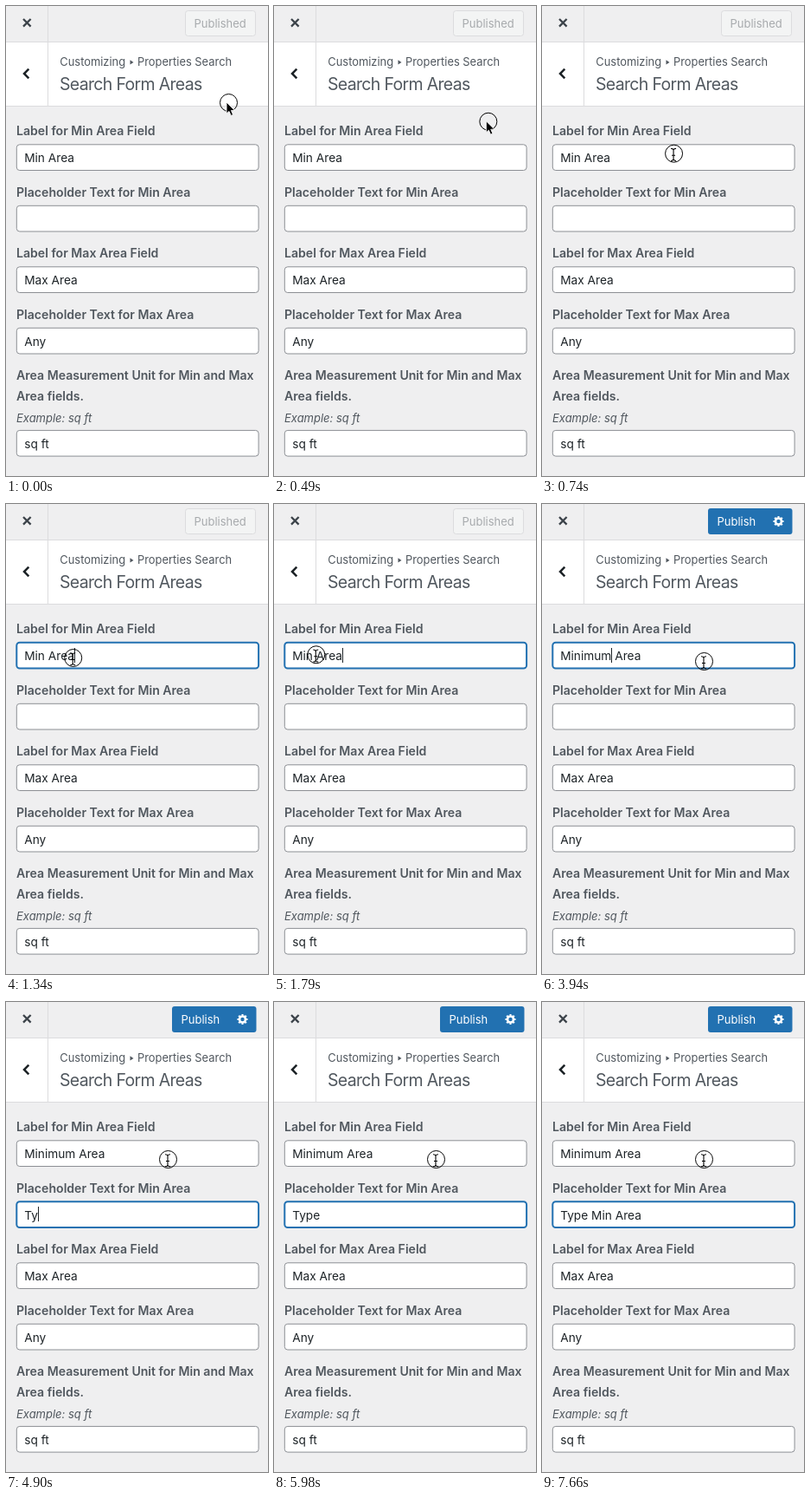
An HTML page that plays this animation: 303x542 px, repeating every 8 s.

```html
<!DOCTYPE html>
<html lang="en">
<head>
<meta charset="utf-8">
<title>Search form settings</title>
<style>
  html, body { margin: 0; width: 100%; height: 100%; overflow: hidden; background: #efeff0; }
  svg { display: block; width: 303px; height: 542px; }
  text { font-family: Inter, "Open Sans", sans-serif; fill: #50575e; white-space: pre; }
  .crumb { font-size: 12.9px; }
  .title { font-size: 19.5px; letter-spacing: -.68px; }
  .label { font-size: 14.1px; font-weight: 600; }
  .hint { font-size: 13px; font-style: italic; }
  .value { font-size: 13.7px; fill: #1d2327; }
  .button { font-size: 13px; }
  .field { fill: #fff; stroke: #8c8f94; stroke-width: 1; }
  .field.focus { stroke: #2271b1; stroke-width: 2; }
</style>
</head>
<body>
<svg id="stage" viewBox="0 0 303 542">
  <rect width="303" height="542" fill="#efeff0"/>
  <rect y="42" width="303" height="73" fill="#fff"/>
  <path d="M0 41.5H303M0 115.5H303M48.5 0V115" stroke="#dcdcde"/>
  <path d="M20 15l8.6 8.6m0-8.6l-8.6 8.6" stroke="#3c434a" stroke-width="2.3"/>
  <path d="M26.3 72.7l-5.3 5.3l5.3 5.3" fill="none" stroke="#1d2327" stroke-width="2.5"/>
  <text class="crumb" x="62.3" y="69">Customizing</text>
  <path d="M143.5 62.3l4 2.6l-4 2.6z" fill="#50575e"/>
  <text class="crumb" x="152" y="69">Properties Search</text>
  <text class="title" x="62" y="97">Search Form Areas</text>

  <g id="saved">
    <rect x="207.5" y="5.5" width="81" height="29" rx="3" fill="#f3f4f4" stroke="#dcdcde"/>
    <text class="button" x="217.5" y="25" style="fill:#a7aaad">Published</text>
  </g>
  <g id="unsaved">
    <rect x="192" y="5" width="97.5" height="30" rx="3" fill="#2271b1"/>
    <text class="button" x="202.5" y="25" style="fill:#fff">Publish</text>
    <g fill="none" stroke="#fff">
      <circle cx="273.5" cy="20" r="3.5" stroke-width="2.6"/>
      <circle cx="273.5" cy="20" r="5.1" stroke-width="2" pathLength="16" stroke-dasharray="1" stroke-dashoffset=".5"/>
    </g>
  </g>

  <g id="form"></g>
  <rect id="caret" width="1" height="17" fill="#1d2327"/>
  <g id="pointer">
    <circle r="10" fill="none" stroke="#000" stroke-width="1"/>
    <path id="arrow" d="M-2.5-.5v13.2l3-2.8l2.2 5l2.4-1l-2.2-4.9h4.2z" fill="#000" stroke="#fff" stroke-width=".9"/>
    <path id="beam" d="M-3.5-5.8q2.6 0 3 1.8q.4-1.8 3-1.8M-.5-4V6.5M-3.5 8.3q2.6 0 3-1.8q.4 1.8 3 1.8M-2.5 2h4" fill="none" stroke="#000" stroke-width="1.1"/>
  </g>
</svg>
<script>
const LOOP = 8000, TEXT_X = 21.2;
const $ = id => document.getElementById(id);

function add(tag, attrs, content = "") {
  const el = document.createElementNS("http://www.w3.org/2000/svg", tag);
  for (const key in attrs) el.setAttribute(key, attrs[key]);
  el.textContent = content;
  return $("form").appendChild(el);
}

const labels = [
  [149, "Label for Min Area Field"],
  [219.5, "Placeholder Text for Min Area"],
  [290, "Label for Max Area Field"],
  [360.5, "Placeholder Text for Max Area"],
  [431, "Area Measurement Unit for Min and Max"],
  [455.3, "Area fields."]
];
labels.forEach(([y, s]) => add("text", { class: "label", x: 12, y }, s));
add("text", { class: "hint", x: 12, y: 480 }, "Example: sq ft");

const fields = [[159.8, "Min Area"], [230.3, ""], [300.8, "Max Area"], [371.3, "Any"], [489.4, "sq ft"]]
  .map(([y, s]) => ({
    y,
    box: add("rect", { class: "field", x: 12.3, y, width: 279.8, height: 29.7, rx: 3.5 }),
    text: add("text", { class: "value", x: TEXT_X, y: y + 20.2 }, s)
  }));

// time, focused field, its text, caret index (-1: hidden)
const edits = [
  [0, -1, "", -1],
  [1110, 0, "Min Area", 8],
  [1870, 0, "Min Area", 3],
  [2300, 0, "Min Area", -1],
  [2720, 0, "Mini Area", 4],
  [3290, 0, "Minim Area", 5],
  [3640, 0, "Minimu Area", 6],
  [3880, 0, "Minimum Area", 7],
  [4300, 1, "", 0],
  [4750, 1, "T", 1],
  [4900, 1, "Ty", 2],
  [5080, 1, "Typ", 3],
  [5260, 1, "Type", 4],
  [5440, 1, "Type ", 5],
  [5980, 1, "Type ", -1],
  [6120, 1, "Type M", 6],
  [6440, 1, "Type Mi", 7],
  [6680, 1, "Type Min", 8],
  [6910, 1, "Type Min ", 9],
  [7090, 1, "Type Min A", 10],
  [7240, 1, "Type Min Ar", 11],
  [7420, 1, "Type Min Are", 12],
  [7600, 1, "Type Min Area", 13],
  [7660, 1, "Type Min Area", -1]
];

const smooth = p => p * p * (3 - 2 * p);
const easeOut = p => 1 - (1 - p) ** 2.1;
// start, end, target x, target y, easing for x, easing for y
const moves = [
  [315, 880, 107.5, 177.5, p => smooth(p ** 1.6), p => smooth(p ** .82)],
  [1265, 1510, 52.5, 177.5, easeOut, easeOut],
  [1630, 1870, 47.5, 172.5, smooth, smooth],
  [2115, 2360, 187.5, 181.5, smooth, smooth]
];

function pointerAt(t) {
  let x = 257.5, y = 111.5;
  for (const [from, to, tx, ty, ex, ey] of moves) {
    if (t < from) break;
    const p = Math.min(1, (t - from) / (to - from));
    x += (tx - x) * ex(p);
    y += (ty - y) * ey(p);
  }
  return [x, y];
}

const pen = document.createElement("canvas").getContext("2d");
function widthOf(s) {
  pen.font = '13.7px Inter, "Open Sans", sans-serif';
  return pen.measureText(s).width;
}

const show = (el, on) => { el.style.display = on ? "" : "none"; };

function render(t) {
  const [, focus, text, caret] = edits.findLast(e => e[0] <= t);
  fields.forEach((f, i) => f.box.classList.toggle("focus", i === focus));
  fields[0].text.textContent = focus === 0 ? text : focus === 1 ? "Minimum Area" : "Min Area";
  fields[1].text.textContent = focus === 1 ? text : "";

  show($("caret"), caret >= 0);
  if (caret >= 0) {
    $("caret").setAttribute("x", Math.round(TEXT_X + widthOf(text.slice(0, caret))));
    $("caret").setAttribute("y", Math.round(fields[focus].y + 6));
  }

  show($("saved"), t < 2840);
  show($("unsaved"), t >= 2840);

  const [x, y] = pointerAt(t);
  $("pointer").setAttribute("transform", `translate(${x} ${y})`);
  show($("arrow"), y < 160);
  show($("beam"), y >= 160);
}

const start = performance.now();
function tick(now) {
  render(Math.max(0, now - start) % LOOP);
  requestAnimationFrame(tick);
}
render(0);
requestAnimationFrame(tick);
</script>
</body>
</html>
```
